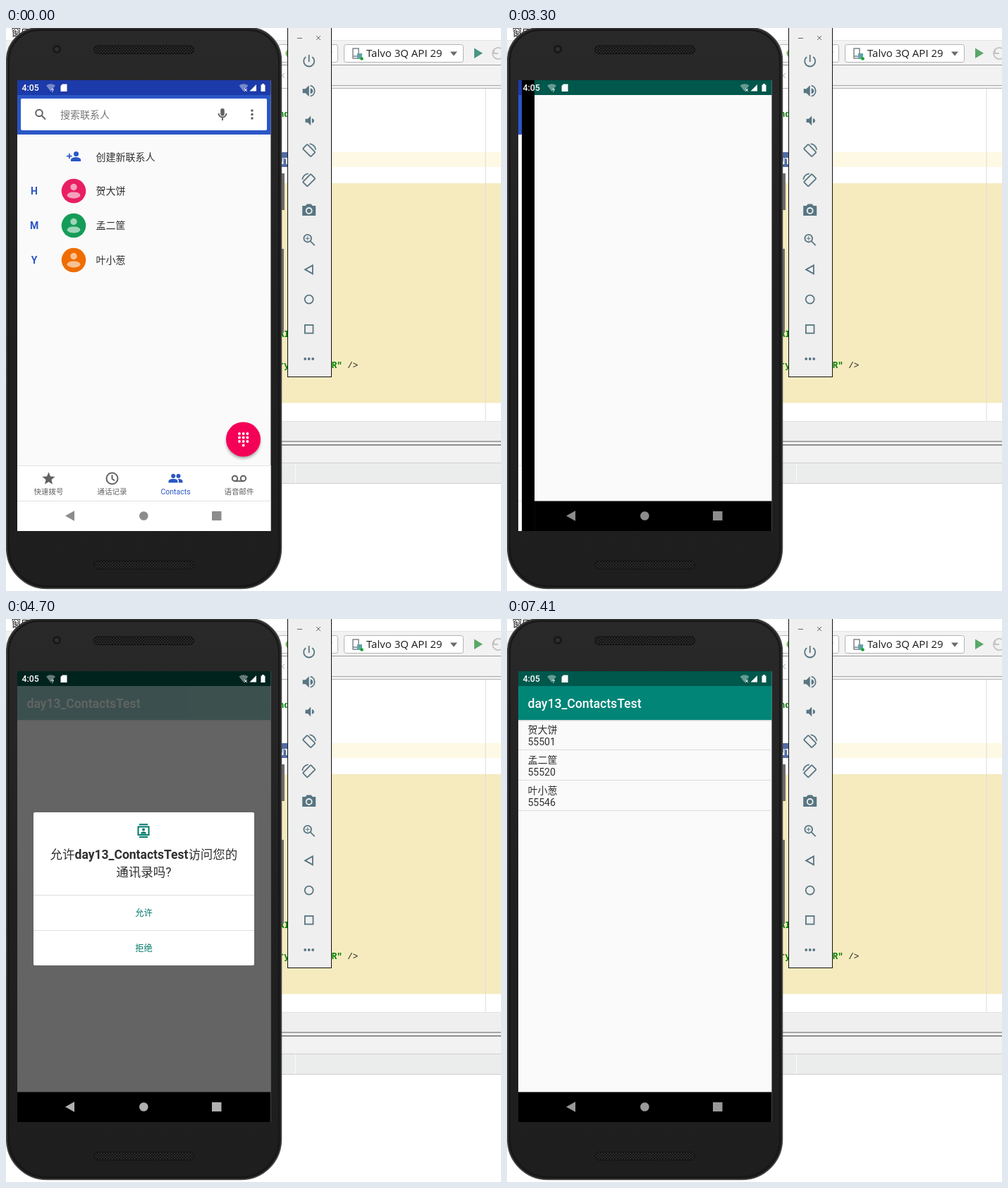
Recreate the animation shown at these times as an HTML page. Size 702 by 798 pixels, loop 7.87 s.

```html
<!DOCTYPE html>
<html lang="zh-CN">
<head>
<meta charset="utf-8">
<title>Contacts permission demo</title>
<style>
html, body { margin: 0; width: 100%; height: 100%; overflow: hidden; background: #fff; }
svg { display: block; width: 702px; height: 798px; }
text { white-space: pre; }
.ui { font: 14.7px "Open Sans", "Noto Sans CJK SC", "Noto Sans CJK", sans-serif; fill: #1c1c1c; }
.code { font: 12.5px "Liberation Mono", monospace; fill: #222; }
.ph { font: 14px Roboto, "Noto Sans CJK SC", "Noto Sans CJK", sans-serif; fill: #303030; }
.b { font-weight: bold; }
.tag { fill: #000080; font-weight: bold; }
.ns { fill: #660e7a; font-weight: bold; }
.attr { fill: #0000ff; font-weight: bold; }
.str { fill: #008000; font-weight: bold; }
.sel tspan { fill: #fff; }
.fold .str { fill: #66756a; }
.mid { text-anchor: middle; }
.s { fill: none; stroke: currentColor; stroke-width: 2; }
#tools .s { stroke-width: 1.8; }
</style>
</head>
<body>
<svg viewBox="0 0 702 798" xmlns="http://www.w3.org/2000/svg">
<defs>
  <clipPath id="screen"><rect x="16" y="74" width="359.5" height="639"/></clipPath>
  <clipPath id="allowRow"><rect x="39" y="391.5" width="313" height="49.5"/></clipPath>
  <pattern id="mesh" width="4" height="4" patternUnits="userSpaceOnUse">
    <rect width="4" height="4" fill="#2a2a2a"/><circle cx="1" cy="1" r="1.1" fill="#101010"/><circle cx="3" cy="3" r="1.1" fill="#101010"/>
  </pattern>
  <linearGradient id="body" x2="0" y2="1">
    <stop stop-color="#292929"/><stop offset=".5" stop-color="#202020"/><stop offset="1" stop-color="#1e1e1e"/>
  </linearGradient>
  <filter id="soft" x="-30%" y="-30%" width="160%" height="160%"><feGaussianBlur stdDeviation="2"/></filter>
</defs>

<g id="ide">
  <rect width="702" height="798" fill="#fff"/>
  <rect y="17" width="702" height="69" fill="#f2f2f2"/>
  <path d="M0 17.5H702" stroke="#e4e4e4"/>
  <g class="ui">
    <text x="7.5" y="11" style="font-size:13.8px">窗口(<tspan text-decoration="underline">W</tspan>)</text>
    <text x="73.5" y="11" style="font-size:13.8px">帮助(<tspan text-decoration="underline">H</tspan>)</text>
    <g fill="#fff" stroke="#b4b4b4"><rect x="386.5" y="23.5" width="84" height="25" rx="3"/><rect x="479.5" y="23.5" width="169" height="25" rx="3"/></g>
    <circle cx="403" cy="36" r="6.5" fill="#78b257"/><circle cx="410.5" cy="42" r="2.5" fill="#18a42c"/>
    <text x="417" y="41" style="font-size:15px">app</text>
    <text x="511" y="41" style="font-size:15px">Talvo 3Q API 29</text>
    <path d="M453 33.5h10l-5 6zM630 33.5h10l-5 6z" fill="#6a6a6a"/>
    <path d="M492 29h8v14h-8zM492 40h8" fill="none" stroke="#7d8489" stroke-width="1.5"/>
    <rect x="498" y="36" width="7" height="8" fill="#62a3a8"/><circle cx="504.5" cy="43.5" r="2.3" fill="#18a42c"/>
    <path id="hammer" d="M356 32l6-5 4 2-2 3 9 9-2.5 2.5-9-9-2 2z"/>
    <rect id="hover" x="656" y="22" width="28" height="28" rx="3"/>
    <path id="play" d="M664 28.500L676 35.700 664 43z"/>
    <path d="M702 29a8 8 0 1 0 0 14M692 30v6h6" fill="none" stroke="#c4c4c4" stroke-width="1.800"/>
    <path d="M0 52.500H702" stroke="#9c9c9c"/>
    <rect y="54" width="203" height="27" fill="#d5d5d5"/><rect x="203" y="54" width="201" height="31" fill="#fff"/>
    <path d="M0 81.500H203M404 81.500H702M29.500 54V81M203.500 54V81M404.500 54V81" stroke="#a6a6a6"/>
    <path d="M0 85.500H702" stroke="#b4b4b4"/>
    <path d="M12 64l7 7m0-7l-7 7M186 64l7 7m0-7l-7 7M388 64l7 7m0-7l-7 7" stroke="#a9a9a9"/>
    <text x="-2" y="73">l</text>
    <circle cx="48.5" cy="68" r="8" fill="#a3bde0"/><text x="48.5" y="72.5" class="mid b" style="font-size:12px;fill:#3e5c86">C</text>
    <text x="61" y="73">MainActivity.java</text>
    <path d="M219 59h12v13h-17v-8z" fill="#a9b1b7"/><rect x="214" y="69" width="17" height="9" fill="#c9dfbb"/>
    <text x="222.5" y="77" class="mid b" style="font-size:9px">MF</text>
    <text x="234.500" y="73">AndroidManifest.xml</text>
  </g>
  <rect y="86" width="702" height="471" fill="#fff"/>
  <rect y="176" width="702" height="21" fill="#fef9e4"/><rect y="176" width="454" height="21" fill="#526da5"/>
  <rect y="220" width="702" height="311.5" fill="#f5ebbe"/><rect y="531" width="64" height="22" fill="#f5ebbe"/>
  <rect x="94" y="288" width="150" height="20" fill="#e9f5e6"/>
  <path d="M680 86V557" stroke="#dcdcdc"/>
  <path d="M21.5 422V490" stroke="#ece2b4"/>
  <path d="M162 151H252" stroke="#86b886" stroke-width="1.2" stroke-dasharray="2 1.5"/>
  <g id="code" class="code"></g>
  <rect y="557" width="702" height="60" fill="#f2f2f2"/><rect y="557" width="702" height="28" fill="#efefef"/>
  <path d="M0 557.5H702" stroke="#e2e2e2"/>
  <path d="M0 586H702" stroke="#8e8e8e" stroke-width="1.5"/><path d="M0 591H702" stroke="#8e8e8e" stroke-width="2"/>
  <path d="M4 569l3 3-3 3" fill="none" stroke="#999"/>
  <text class="ui" x="18.5" y="578" style="fill:#555">uses-permission</text>
  <rect y="592" width="65" height="24" fill="#d3d3d3"/><path d="M65.5 592V616" stroke="#999"/>
  <text class="ui" x="-4" y="608">Manifest</text>
  <rect y="617" width="702" height="28" fill="#ebedec"/>
  <path d="M0 616.5H702M0 645.5H702" stroke="#cfcfcf"/><path d="M58.5 617V645M410.5 617V645" stroke="#fafafa"/>
</g>

<g id="emu">
  <path d="M390 206h5v52h-5zM390 313h4v119h-4z" fill="#716b6b"/>
  <path d="M.7 45.500a46 46 0 0 1 46-46H344.500a46 46 0 0 1 46 46V738a57 57 0 0 1-57 56.500H57.700a57 57 0 0 1-57-56.500z" fill="url(#body)" stroke="#474747" stroke-width="1.500"/>
  <path d="M4 46a43 43 0 0 1 43-43H344a43 43 0 0 1 43 43V737a54 54 0 0 1-54 54H58a54 54 0 0 1-54-54z" fill="none" stroke="#161616" stroke-width="2"/>
  <circle cx="72" cy="30" r="6" fill="#181818"/><circle cx="72" cy="30" r="3" fill="#2c3138"/>
  <g fill="url(#mesh)" stroke="#111"><rect x="124.5" y="25" width="142" height="11.5" rx="5.7"/><rect x="124.5" y="755.5" width="142" height="11.5" rx="5.7"/></g>

  <g clip-path="url(#screen)">
    <rect x="16" y="74" width="360" height="639" fill="#000"/>
    <g id="contacts">
      <rect x="16" y="74" width="360" height="639" fill="#fafafa"/>
      <rect x="16" y="74" width="360" height="21" fill="#1c3aa9"/><rect x="16" y="95" width="360" height="56" fill="#2a56c6"/>
      <rect x="21" y="100" width="349" height="45" rx="2" fill="#fff"/>
      <g id="people"></g>
      <g fill="#616161">
        <circle cx="349" cy="117" r="1.8"/><circle cx="349" cy="122.5" r="1.8"/><circle cx="349" cy="128" r="1.8"/>
        <rect x="304.2" y="114" width="5.6" height="10.5" rx="2.8"/>
      </g>
      <g color="#616161"><path class="s" d="M301.5 121a5.5 5.5 0 0 0 11 0M307 127v4"/>
        <circle class="s" cx="47" cy="120.5" r="4.8"/><path class="s" d="M50.5 124L56 129.5"/></g>
      <text class="ph" x="77" y="127.5" style="fill:#757575">搜索联系人</text>
      <g fill="#2a56c6"><circle cx="99.5" cy="178.5" r="3.5"/><path d="M92 189v-2.5q0-3 7-3.5 7 .5 7 3.5V189z"/><path d="M86 180.7h7.5v1.7H86zM89 177.7h1.7v7.5H89z"/></g>
      <text class="ph" x="127.5" y="187.5">创建新联系人</text>
      <circle cx="336.5" cy="586" r="24" fill="#000" opacity=".35" filter="url(#soft)"/>
      <circle cx="336.5" cy="583" r="24.5" fill="#f50057"/><g id="dots" fill="#fff"></g>
      <rect x="16" y="620" width="360" height="93" fill="#fff"/><path d="M16 620.5H376M16 670.5H376" stroke="#e2e2e2"/>
      <g id="tabs" class="ph mid"></g>
    </g>
    <g id="app">
      <rect x="16" y="74" width="360" height="639" fill="#fafafa"/><rect x="16" y="74" width="360" height="21" fill="#00574b"/>
      <g id="bar"><rect x="16" y="95" width="360" height="49.5" fill="#000" opacity=".15"/><rect x="16" y="95" width="360" height="48" fill="#008577"/>
        <text class="ph" x="29.5" y="126" style="font-size:17.6px;font-weight:500;fill:#fff">day13_ContactsTest</text></g>
      <g id="list"></g>
      <rect x="16" y="670.5" width="360" height="43" fill="#000"/>
    </g>
    <rect id="dim" x="16" y="74" width="360" height="597" fill="#000"/>
    <g id="dialog">
      <rect x="39" y="274" width="313" height="217" rx="2" fill="#fff"/>
      <circle id="ripple" fill="#000" clip-path="url(#allowRow)"/>
      <path d="M39 391.5H352M39 441.5H352" stroke="#dedede"/>
      <g color="#00796b"><rect class="s" x="187.5" y="294.5" width="15" height="11.5"/><path class="s" d="M189 291.2h12M189 309h12"/>
        <circle cx="195" cy="298.5" r="2" fill="#00796b"/><path d="M191 304.5q0-3 4-3t4 3z" fill="#00796b"/></g>
      <g class="ph mid"><text x="195.5" y="340" style="font-size:17.5px">允许<tspan class="b">day13_ContactsTest</tspan>访问您的</text>
        <text x="195.5" y="365" style="font-size:17.5px">通讯录吗?</text>
        <text x="195.5" y="421" style="font-size:12.3px;fill:#00796b">允许</text><text x="195.5" y="471" style="font-size:12.3px;fill:#00796b">拒绝</text></g>
    </g>
    <g fill="#fff">
      <text class="ph" x="22.5" y="89.3" style="font-size:12.3px;font-weight:500;fill:#fff">4:05</text>
      <path d="M57 81.5q6.5-4.5 13 0L63.5 90zM330.5 81.5q6.5-4.5 13 0L337 90z" opacity=".4"/>
      <text class="ph b" x="64" y="90.5" style="font-size:8px;fill:#fff">?</text>
      <path d="M338 86l4 4m0-4l-4 4" stroke="#fff"/>
      <path d="M80 79.5h6.5v10.5h-9v-8z"/><path d="M345.5 89.5h9.5v-9.5z"/>
      <path d="M361.5 80.5h1.5v-1.5h3v1.5h1.5v9.5h-6z"/>
    </g>
    <g id="nav"><path d="M84 691.5l13-7.3v14.6z"/><circle cx="195.3" cy="691.5" r="6.3"/><rect x="292" y="685" width="13.5" height="13"/></g>
  </g>

  <rect x="399.5" y="-1" width="62" height="495.5" fill="#efefef" stroke="#111"/>
  <path d="M413 14.5h7M440 11l6 6m0-6l-6 6" stroke="#666" fill="none"/>
  <g id="tools" color="#587582" fill="#587582"></g>
</g>

<path id="cursor" d="M.5 .5V16L4 12.7 6.5 19 9.3 17.9 6.7 11.7H11.3z" fill="#fff" stroke="#000"/>
</svg>
<script>
const $ = id => document.getElementById(id);
const at = (x, y, body) => `<g transform="translate(${x} ${y})">${body}</g>`;
const arc = d => `<path class="s" d="${d}"/>`;

// Manifest listing
const lines = `<?xml version="1.0" encoding="utf-8"?>
<manifest xmlns:android="http://schemas.android.com/apk/res/android"
    package="com.example.day13_contactstest">

    <uses-permission android:name="android.permission.READ_CONTACTS"/>

    <application
        android:allowBackup="true"
        android:icon="@mipmap/ic_launcher"
        android:label="day13_ContactsTest"
        android:roundIcon="@mipmap/ic_launcher_round"
        android:supportsRtl="true"
        android:theme="@style/AppTheme">
        <activity android:name=".MainActivity">
            <intent-filter>
                <action android:name="android.intent.action.MAIN" />

                <category android:name="android.intent.category.LAUNCHER" />
            </intent-filter>
        </activity>
    </application>`.split('\n');
const kinds = ['str', 'ns', 'attr', '', 'tag'];
const paint = line => line.replace(/("[^"]*")|(android(?=[:=]))|(:?\w+=|xmlns:|:|=)|([<>\/?]+)|([\w-]+)/g, (m, ...g) => {
  const kind = kinds[g.slice(0, 5).findIndex(Boolean)];
  return `<tspan class="${kind}">${m.replace(/</g, '&lt;')}</tspan>`;
});
$('code').innerHTML = lines.map((line, i) => {
  const cls = i == 4 ? 'sel' : i == 9 ? 'fold' : '';
  return `<text class="${cls}" x="-71" y="${103.3 + 22.3 * i}">${paint(line)}</text>`;
}).join('');

// Contacts
const people = [['H', '贺大饼', '55501', '#e91e63'], ['M', '孟二筐', '55520', '#159c58'], ['Y', '叶小葱', '55546', '#ef6c00']];
$('people').innerHTML = people.map(([letter, name, , color], i) => at(96, 231 + 49 * i,
  `<circle r="17.3" fill="${color}"/><g fill="#fff" opacity=".58"><circle cy="-5.5" r="4.7"/><path d="M-9.5 7q0-5.5 9.5-5.5T9.5 7Q6 10.5 0 10.5T-9.5 7z"/></g>
  <text class="ph mid b" x="-56" y="5" style="fill:#2a56c6">${letter}</text><text class="ph" x="31.5" y="5">${name}</text>`)).join('');
$('list').innerHTML = people.map(([, name, phone], i) => at(29.5, 143 + 43 * i,
  `<text class="ph" y="18.5">${name}</text><text class="ph" y="36">${phone}</text><path d="M-13.5 42.5H346" stroke="#dcdcdc"/>`)).join('');
$('dots').innerHTML = [...Array(10).keys()].map(i => i < 9 ? [i % 3, Math.floor(i / 3)] : [1, 3])
  .map(([c, r]) => `<circle cx="${331 + 5.7 * c}" cy="${575 + 5.5 * r}" r="1.9"/>`).join('');

const tabs = [
  ['快速拨号', '<path d="M0-9l2.5 6 6.5.5-5 4.3 1.5 6.4L0 4.8-5.5 8.2-4 1.8-9-2.5-2.5-3z"/>'],
  ['通话记录', '<circle class="s" r="8"/>' + arc('M0-5V.5L3.5 3')],
  ['Contacts', '<circle cx="-3.3" cy="-3.5" r="3"/><circle cx="4" cy="-3.5" r="3"/><path d="M-10 6V3.5Q-9 .5-3.3 .5T3 3.5V6zM4.5 6V3Q4 1.5 3 .6 9.5 .5 10 3.5V6z"/>'],
  ['语音邮件', '<circle class="s" cx="-6" r="3.7"/><circle class="s" cx="6" r="3.7"/>' + arc('M-6 3.7H6')]];
$('tabs').innerHTML = tabs.map(([label, icon], i) => {
  const color = i == 2 ? '#2a56c6' : '#616161';
  return at(60.5 + 90 * i, 638.5, `<g fill="${color}" color="${color}">${icon}</g><text y="22" style="font-size:10.5px;fill:${color}">${label}</text>`);
}).join('');

// Emulator tool strip
const speaker = '<path d="M-9-3h4l5-5V8l-5-5h-4z"/>';
const turn = side => `<g transform="scale(${side} 1)"><rect class="s" x="-4.5" y="-8" width="9" height="16" rx="1" transform="rotate(-45)"/>${arc('M1-9.5A9.5 9.5 0 0 1 9.5-1')}</g>`;
const tools = [
  arc('M0-9V1M4.5-6a7.5 7.5 0 1 1-9 0'),
  speaker + '<path d="M2-4q3.5 1 3.5 4T2 4z"/>' + arc('M2-7.5a7.7 7.7 0 0 1 0 15'),
  `<g transform="translate(2.5) scale(.85)">${speaker}<path d="M2-4q3.5 1 3.5 4T2 4z"/></g>`,
  turn(1), turn(-1),
  '<path d="M-9.5-6H-5l2-2.5h6L5-6h4.5V8h-19z"/><circle cy="1" r="4" fill="#587582" stroke="#efefef" stroke-width="1.8"/>',
  '<circle class="s" cx="-2" cy="-2" r="5.3"/>' + arc('M2 2L8 8') + '<path d="M-5-2.5h6v1h-6zM-2.500-5h1v6h-1z"/>',
  arc('M-5.5 0L5.2-6V6z'),
  '<circle class="s" r="6"/>',
  '<rect class="s" x="-5.8" y="-5.8" width="11.6" height="11.6"/>',
  '<circle cx="-5.5" r="1.9"/><circle r="1.9"/><circle cx="5.5" r="1.9"/>'];
$('tools').innerHTML = tools.map((icon, i) => at(429.7, 47 + 42.2 * i, icon)).join('');

// Timeline
const LOOP = 7870;
const clamp = v => Math.max(0, Math.min(1, v));
const show = (id, opacity) => { $(id).style.opacity = opacity; };
const slide = (id, x) => $(id).setAttribute('transform', `translate(${x} 0)`);
const step = (t, from, to, n) => t < from ? 0 : Math.min(n, 1 + Math.floor((t - from + 10) * (n - 1) / (to - from)));

function pointer(t) {
  if (t < 70) return null;
  if (t < 1430) {
    const p = (step(t, 70, 820, 11) - 1) / 10, e = p * p * (3 - 2 * p);
    return [608 + 52 * e, 627 - 589 * e];
  }
  if (t < 1510) return [660, 38];
  if (t < 2130) {
    const p = step(t, 1660, 2130, 7) / 7;
    return [655 - 415 * p, 41 + 59 * p - 125 * p * p];
  }
  if (t < 4850) return null;
  if (t < 5310) {
    const p = (step(t, 4470, 5240, 11) - 6) / 5;
    return [285 - 105 * p, -30 + 353 * p];
  }
  if (t < 6800) {
    const p = step(t, 5310, 5470, 3) / 3;
    return [180 - 6 * p - 33 * p * (1 - p), 323 + 93 * p * (2 - p)];
  }
  const k = step(t, 6800, 7410, 9);
  return k < 9 ? [174 + 63.4 * k, 416 + 45 * k] : null;
}

function draw(t) {
  const c = pointer(t);
  show('cursor', c ? 1 : 0);
  if (c) $('cursor').setAttribute('transform', `translate(${Math.round(c[0])} ${Math.round(c[1])})`);

  const building = t >= 1430 && t < 2990;
  $('emu').style.display = t >= 890 && t < 2590 ? 'none' : '';
  $('play').style.fill = building ? '#c3c3c3' : t < 1430 ? '#4a9580' : '#59a869';
  $('hammer').style.fill = building ? '#bcbcbc' : '#6e6e6e';
  $('hover').style.fill = t < 970 ? '#e0e0e0' : '#d2d2d2';
  show('hover', t >= 820 && t < 1430 ? 1 : 0);

  // new task slides over the old one
  const rest = (1 - step(t, 3140, 3600, 7) / 7) ** 5;
  slide('app', 378 * rest);
  slide('contacts', -378 * (1 - rest));

  const ask = step(t, 4470, 5240, 11);
  const gone = t < 6030 ? 0 : t < 6110 ? .5 : 1;
  show('bar', clamp((ask - 2) / 5));
  show('dim', .6 * clamp(ask / 4) * (1 - gone));
  show('dialog', clamp((ask - 1) / 3) * (1 - gone));
  show('list', gone ? 1 : 0);

  const press = t < 5620 ? 0 : t < 5790 ? .09 : [0, .5, .83, 1, 1, 1][step(t, 5790, 6110, 5)];
  const ripple = $('ripple');
  ripple.setAttribute('cx', 174 + 17 * press * press);
  ripple.setAttribute('cy', 416);
  ripple.setAttribute('r', 158 * press);
  show('ripple', press < .1 ? .08 : .11);

  const lift = 140 + 28 * step(t, 3770, 3920, 3) + (t >= 4240 ? 6 : 0);
  const g = Math.round(ask ? Math.max(153, 230 - 13.5 * ask) : lift);
  $('nav').style.fill = `rgb(${g},${g},${g})`;
}

const start = performance.now();
function tick() {
  draw((performance.now() - start) % LOOP);
  requestAnimationFrame(tick);
}
tick();
</script>
</body>
</html>
```
